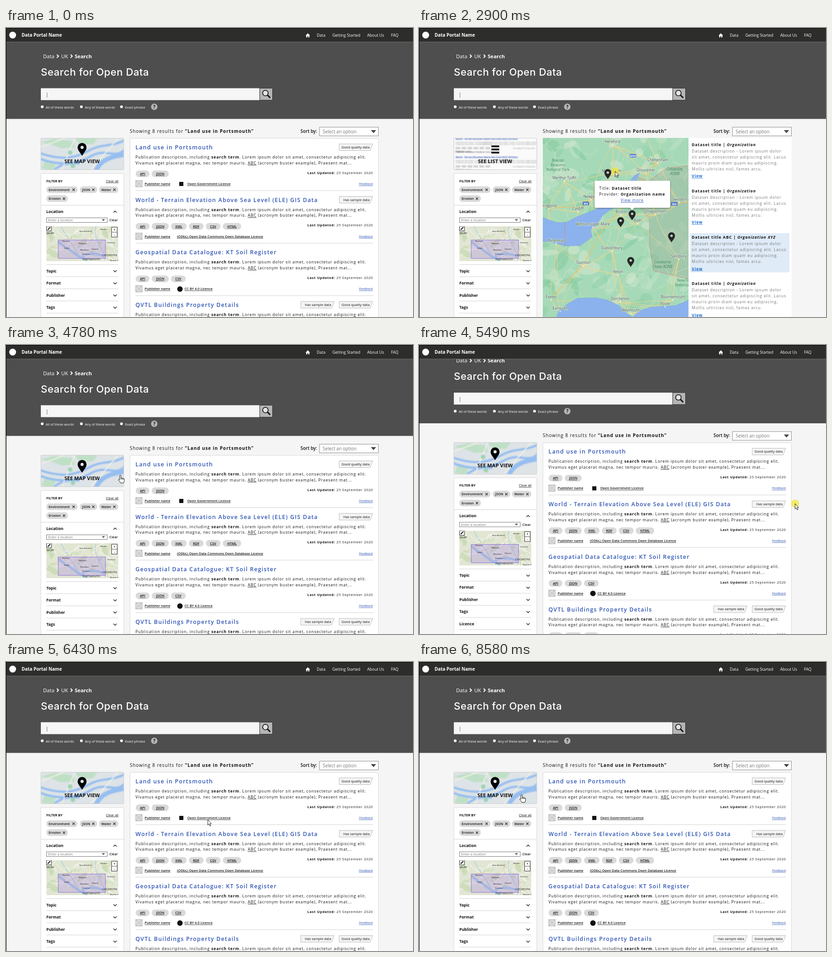
An HTML page that plays this animation: 888 by 631 pixels, repeating every 9.28 s.

```html
<!DOCTYPE html>
<html lang="en">
<head>
<meta charset="utf-8">
<title>Open data search</title>
<style>
  html, body { margin: 0; width: 100%; height: 100%; overflow: hidden; background: #f5f5f5; }
  #stage { display: block; width: 888px; height: 631px; }
  text { font-family: "Open Sans", sans-serif; fill: #111; }
  .b { font-weight: 700; }
  .m { font-weight: 600; }
  .i { font-style: italic; }
  .u { text-decoration: underline; }
  .s { letter-spacing: .1em; }
  .c { text-anchor: middle; }
  .w { fill: #fff; }
  .blue { fill: #2f55b4; }
  .link { fill: #1469d2; }
  .gray { fill: #757575; }
  .park { fill: #3f8a60; }
  .halo { paint-order: stroke; stroke: #dcefe0; stroke-width: 1.5px; fill: #3f4a48; }
  .head { font: 500 22px Inter, sans-serif; letter-spacing: .5px; }
</style>
</head>
<body>
<svg id="stage" viewBox="0 0 888 631"></svg>
<script>
// Type sizes are in units of a 1440 px wide layout.
const UNIT = 888 / 1440;
const text = (x, y, str, size, cls = '') =>
  `<text x="${x}" y="${y}" font-size="${(size * UNIT).toFixed(2)}" class="${cls}">${str}</text>`;
const span = (cls, str) => `<tspan class="${cls}">${str}</tspan>`;
const rect = (x, y, w, h, fill, more = '') =>
  `<rect x="${x}" y="${y}" width="${w}" height="${h}" fill="${fill}" ${more}/>`;
const path = (d, stroke, width = 1, fill = 'none', more = '') =>
  `<path d="${d}" stroke="${stroke}" stroke-width="${width}" fill="${fill}" ${more}/>`;
const shape = (d, fill) => `<path d="${d}" fill="${fill}"/>`;
const dot = (x, y, r, fill) => `<circle cx="${x}" cy="${y}" r="${r}" fill="${fill}"/>`;
const rule = (x, y, w) => rect(x, y, w, 1, '#d2d2d2');
const pin = (x, y, scale, fill, hole) =>
  `<g transform="translate(${x} ${y}) scale(${scale})">
    ${shape('M0 13C-3 7-9 2-9-4a9 9 0 1 1 18 0C9 2 3 7 0 13Z', fill)}${dot(0, -4, 3.2, hole)}</g>`;
const repeat = (n, fn) => Array.from({ length: n }, (_, i) => fn(i)).join('');

let seed = 7;
const random = (lo, hi) => {
  seed = (seed * 16807) % 2147483647;
  return lo + (hi - lo) * seed / 2147483647;
};
const wiggle = (x1, y1, x2, y2, bend) => {
  const control = k => [x1 + (x2 - x1) * k, y1 + (y2 - y1) * k].map(v => (v + random(-bend, bend)).toFixed(1)).join(' ');
  return `M${x1} ${y1}C${control(.33)} ${control(.67)} ${x2} ${y2}`;
};
const strokes = (n, x1, y1, x2, y2, length, bend) => repeat(n, () => {
  const x = random(x1, x2), y = random(y1, y2);
  return wiggle(x, y, x + random(-length, length), y + random(-length, length), bend);
});
const blobs = (n, x1, y1, x2, y2, size, fills) => repeat(n, () =>
  `<ellipse transform="translate(${random(x1, x2)} ${random(y1, y2)}) rotate(${random(0, 180)})"
    rx="${random(size / 4, size)}" ry="${random(size / 6, size / 2)}" fill="${fills[Math.floor(random(0, fills.length))]}" opacity=".55"/>`);

// ---- Page header ----
function nav() {
  return rect(0, 0, 888, 30, '#2d2d2c') + rect(0, 0, 888, 1, '#000') + rect(0, 30, 888, 1, '#6e6e6e') +
    dot(14.5, 15.5, 7.5, '#fff') + text(34, 19, 'Data Portal Name', 16, 'b w') +
    shape('M653.5 16.5l5-5 5 5h-1.5v4h-2.5v-3h-2v3H655v-4Z', '#fff') +
    text(678, 19.3, 'Data', 14, 'w') + text(712, 19.3, 'Getting Started', 14, 'w') +
    text(788, 19.3, 'About Us', 14, 'w') + text(840, 19.3, 'FAQ', 14, 'w');
}

function header() {
  const option = (x, str) => dot(x, 172, 3, '#fff') + text(x + 7.7, 175.6, str, 12, 'w');
  return rect(0, 0, 888, 198.5, '#4e4e4e') +
    text(81, 66, 'Data', 18, 'w') + text(120.5, 66, 'UK', 18, 'w') + text(150, 66, 'Search', 18, 'b w') +
    path('M111 58l3.5 3.5-3.5 3.5M141 58l3.5 3.5-3.5 3.5', '#fff', 2) +
    '<text x="76" y="103.5" class="head w">Search for Open Data</text>' +
    rect(76, 131.5, 477, 26, '#f6f6f6') + rect(89, 141, 1, 11, '#777') +
    rect(553.5, 131.5, 28, 26, '#b5b5b5', 'stroke="#333"') +
    '<circle cx="566" cy="142" r="6" fill="#e2e2e2" stroke="#111" stroke-width="1.7"/>' +
    path('M570.5 146.5l6 6', '#111', 3) +
    option(79, 'All of these words') + option(164.5, 'Any of these words') + option(252, 'Exact phrase') +
    dot(323.5, 172, 7, '#b5b5b5') + text(323.5, 175.6, '?', 16, 'b c') +
    text(270, 229, 'Showing 8 results for ' + span('b', '“Land use in Portsmouth”'), 16, 's') +
    text(642.5, 228.5, 'Sort by:', 16, 'm') +
    rect(684, 216.5, 128.5, 19, '#fff', 'stroke="#8c8c8c"') +
    text(691, 229.5, 'Select an option', 16, 'gray') + shape('M796 223h11.5l-5.7 6.5Z', '#444');
}

// ---- Sidebar ----
function locationMap() {
  return '<svg x="88" y="433" width="157" height="76" viewBox="88 433 157 76">' +
    rect(88, 433, 157, 76, '#e1e6d3') + blobs(34, 88, 433, 245, 500, 14, ['#bdd5a5', '#efeee6', '#cfdfbd']) +
    path('M114 466C130 482 142 484 152 494S170 500 176 509M166 498Q190 488 214 498', '#a9cfe3', 5) +
    path('M120 433C130 455 145 470 160 500M196 433q-5 20 10 45t8 31', '#a9cfe3', 1.4) +
    path(strokes(26, 88, 433, 245, 509, 45, 9), '#fff', .9) + path(strokes(6, 95, 445, 235, 490, 70, 12), '#e3bd83', .8) +
    rect(114, 463, 103, 40, '#9a74dc', 'fill-opacity=".27" stroke="#8b6fe0"') +
    [['SBURY', 88, 450], ['CHICHESTER', 210, 498], ['PORTSMOUTH', 167, 507]].map(([s, x, y]) => text(x, y, s, 9)).join('') +
    [['New Ainsford', 160, 445], ['Borden', 206, 441], ['Romsey', 123, 467], ['Waltham', 158, 472],
     ['Totton', 126, 482], ['Wickham', 162, 486], ['Havant', 187, 484], ['Fareham', 166, 495], ['Hosham', 221, 470], ['Bognor Regis', 227, 509]]
      .map(([s, x, y]) => text(x, y, s, 7)).join('') +
    rect(88.5, 433, 10.5, 10, '#fff', 'stroke="#222"') + path('M91 440.5l5.5-5.5', '#111', 2) +
    rect(230.5, 435, 12, 21.5, '#fff', 'stroke="#333"') + rect(230.5, 445.5, 12, .8, '#333') +
    text(236.5, 443, '+', 10, 'b c') + text(236.5, 453.5, '-', 10, 'b c') + '</svg>';
}

function sidebar() {
  const chip = (x, y, w, str) => rect(x, y, w, 14.5, '#dadada', 'rx="7"') + text(x + 5, y + 9.8, str, 12, 'm') +
    path(`M${x + w - 11} ${y + 4.8}l5 5m0-5l-5 5`, '#222', 1.2);
  const section = (str, i) => rule(88, 516 + i * 26.5, 157) + text(88, 533.5 + i * 26.5, str, 14, 'b') +
    path(`M234.5 ${529 + i * 26.5}l3.5 3.5 3.5-3.5`, '#222', 1.4);
  return rect(76, 317.5, 181, 500, '#fff', 'stroke="#d8d8d8" rx="2"') +
    text(88, 336.7, 'FILTER BY', 12, 'b') + text(218, 336.7, 'Clear all', 12, 'u') +
    chip(88, 345.8, 68, 'Environment') + chip(161, 345.8, 38, 'JSON') + chip(203, 345.8, 42, 'Water') +
    chip(88, 365.3, 47, 'Erosion') + rule(76, 386.5, 181) +
    text(88, 404, 'Location', 14, 'b') + path('M234.5 403l3.5-3.5 3.5 3.5', '#222', 1.4) +
    rect(88.5, 414.5, 132.5, 10, '#fff', 'stroke="#777"') + text(92, 422.2, 'Enter a location', 12, 'gray') +
    shape('M209 417.5h7l-3.5 4Z', '#555') + text(225.5, 422.2, 'Clear', 12, 'm') + locationMap() +
    ['Topic', 'Format', 'Publisher', 'Tags', 'Licence', 'Keywords', 'Update'].map(section).join('');
}

const thumb = (inner, label) =>
  `<svg x="76" y="240" width="181" height="70" viewBox="76 240 181 70">${inner}</svg>` +
  rect(76, 240.5, 181, 69, 'none', 'stroke="#d0d0d0" rx="2"') + text(166, 295, label, 18, 'b c');

// ---- List view ----
const summary = `Publication description, including ${span('b', 'search term')}. Lorem ipsum dolor sit amet, consectetur adipiscing elit.`;
const dataTitle = 'World - Terrain Elevation Above Sea Level (ELE) GIS Data';

function card([title, chips, badges, licence, mark], i) {
  let x = 283;
  const tags = chips.map(([str, w]) => {
    const tag = rect(x, 311, w, 14.5, '#dadada', 'rx="7"') + text(x + w / 2, 321, str, 12, 'm u c');
    x += w + 5;
    return tag;
  }).join('');
  const badge = (str, k) => {
    const left = 727 - 84 * k;
    return path(`M${left} 253h73l-5.5 14.5H${left}Z`, '#bbb', 1, '#f4f4f4') +
      text(left + (str[0] === 'H' ? 9 : 5), 262.9, str, 12);
  };
  return `<g transform="translate(0 ${i * 114.7})">` + text(282.5, 265, title, 20, 'm s blue') + badges.map(badge).join('') +
    text(282.5, 285, summary, 14, 's') +
    text(282.5, 297.8, `Vivamus eget placerat magna, nec tempor mauris. ${span('u', 'ABC')} (acronym buster example), Praesent mat...`, 14, 's') +
    tags + text(657.5, 318.8, span('b', 'Last Updated:') + ' 25 September 2020', 12, 's') +
    rect(283, 333, 14, 14, '#ddd', 'stroke="#aaa"') + path('M283 333l14 14m0-14l-14 14', '#aaa', .8) +
    text(302.5, 343, 'Publisher name', 12, 'm u') +
    (mark === 'square' ? rect(378, 336, 9, 9, '#111') : mark === 'circle' ? dot(379.5, 340.5, 6, '#111') : '') +
    text({ square: 395.5, circle: 389.5 }[mark] || 373, 343, licence, 12, 'm u') +
    text(770, 343, 'Feedback', 12, 'i u blue') + rule(283, 354.5, 518) + '</g>';
}

function listView() {
  const api = ['API', 30], json = ['JSON', 37], csv = ['CSV', 32];
  const good = 'Good quality data', sample = 'Has sample data';
  const blurredMap = '<g filter="url(#soft)">' + rect(70, 235, 195, 80, '#dde3e6') +
    shape('M76 250l30-8 40 5 5 14-30 2-20-8ZM150 240h50l-10 14h-30ZM85 290l25 5-8 16-25-4Z', '#bfe0c6') +
    path('M70 272C120 290 150 285 180 268S225 262 262 244M70 284C110 300 150 300 185 280S240 290 262 262M105 310Q125 292 160 296', '#96bff0', 5) +
    path('M195 315C205 285 235 280 262 276', '#96bff0', 10) +
    path('M70 262L130 240M120 315L150 240M180 315L245 240', '#f6f3e4', 2) + dot(140, 272, 5, '#9bd4b0') + dot(146, 301, 5, '#9bd4b0') + '</g>';
  return thumb(blurredMap + pin(166, 265, 1.08, '#000', '#dfe9f5'), 'SEE MAP VIEW') +
    rect(270.5, 241, 542, 600, '#fff', 'stroke="#d8d8d8" rx="2"') + [
      ['Land use in Portsmouth', [api, json], [good], 'Open Government Licence', 'square'],
      [dataTitle, [api, json, ['XML', 34], ['RDF', 32], csv, ['HTML', 40]], [sample], '(ODbL) Open Data Commons Open Database Licence'],
      ['Geospatial Data Catalogue: KT Soil Register', [api, json, csv], [], 'CC BY 4.0 Licence', 'circle'],
      ['QVTL Buildings Property Details', [api, json, csv], [good, sample], 'Open Government Licence', 'square']
    ].map(card).join('');
}

// ---- Map view ----
function map() {
  const towns = [
    ['Hereford', 422, 251], ['Cheltenham', 521, 291], ['Gloucester', 495, 313], ['Monmouth', 420, 315], ['Merthyr Tydfil', 317, 330],
    ['Swindon', 568, 377], ['Newport', 375, 371], ['Cardiff', 347, 397], ['Bridgend', 283, 391], ['Bristol', 441, 404], ['Bath', 477, 423],
    ['Chippenham', 516, 403], ['Weston-super-Mare', 379, 431], ['Minehead', 299, 467], ['Glastonbury', 421, 483], ['Salisbury', 567, 501],
    ['Taunton', 358, 515], ['Yeovil', 434, 535], ['Dorchester', 439, 594], ['Bournemouth', 554, 590], ['Poole', 537, 605],
    ['Exeter', 288, 590], ['Exmouth', 308, 615], ['Weymouth', 462, 619]];
  const roads = towns.map(([, x, y]) => [...towns]
    .sort((a, b) => Math.hypot(a[1] - x, a[2] - y) - Math.hypot(b[1] - x, b[2] - y)).slice(1, 5)
    .map(([, x2, y2]) => wiggle(x, y + 5, x2, y2 + 5, 9)).join('')).join('');
  const shield = (x, y, str) => rect(x - 7, y - 4, 14, 8, '#4b73c9', 'rx="1.5"') + text(x, y + 2.5, str, 10, 'b c w');
  const lines = (x, y, rows, cls) => rows.map((s, k) => text(x, y + k * 10, s, 13, cls)).join('');
  return rect(230, 100, 420, 560, '#a6d9b8') +
    blobs(130, 260, 140, 600, 640, 28, ['#83cc9f', '#8ed2a8', '#bfe3c8', '#d3e8d0']) +
    path('M470 322L500 335 540 306 640 295V560L588 548 512 530 503 470 503 418 470 375Z', '#d98374', .8, '#9fb8a0', 'fill-opacity=".5"') +
    path(strokes(110, 260, 140, 600, 590, 45, 14), '#e4ecc5', .7, 'none', 'opacity=".8"') +
    path(roads + 'M422 256L400 170M422 256L330 170M521 295L540 170M521 295L470 170', '#f0d68b', 1) +
    path('M230 390L347 392 375 372 441 385 516 382 568 382 640 372M521 290L495 320 462 360 441 395 400 440 362 512 288 590', '#efc066', 1.6) +
    path('M230 410L270 414 300 425 322 424 345 412 366 404 395 392 430 372 452 345 470 322 482 316 472 335 455 365 430 388 402 408 386 432 374 440 378 456 352 475 320 476 290 468 230 462ZM230 660V640L300 631 306 616 328 600 346 590 386 589 412 594 436 606 452 622 466 631 480 618 506 609 532 608 560 606 588 594 650 592V660Z', '#78a0d8', .6, '#8cb2ee') +
    path('M318 424V476', '#cf7f78', .8) +
    towns.map(([s, x, y]) => dot(x, y + 4, 1.3, '#fff') + text(x, y, s, 13, 'c halo')).join('') +
    lines(303, 292, ['Brecon', 'Beacons', 'National Park'], 'c park') + lines(558, 311, ['Cotswolds', 'AONB'], 'c i park') +
    lines(531, 514, ['Cranborne', 'Chase AONB'], 'c i park') + lines(584, 554, ['New Forest', 'National Park'], 'c park') +
    shield(467, 279, 'M50') + shield(364, 383, 'M4') + shield(557, 384, 'M4') +
    [[412, 319], [465, 409], [440, 424], [551, 457], [462, 511]].map(([x, y]) => pin(x, y, .84, '#262626', '#b9d7c4')).join('') +
    '<g filter="url(#shadow)">' + rect(383, 333.5, 165, 59, '#fff', 'rx="3"') + shape('M460 392h10l-5 6Z', '#fff') + '</g>' +
    text(393, 353, 'Title: ' + span('b', 'Dataset title'), 14, 's') +
    text(393, 366, 'Provider: ' + span('b', 'Organization name'), 14, 's') + text(440, 379, 'View more', 14, 's u blue');
}

function mapView() {
  const blurredList = rect(76, 240, 181, 70, '#fafafa') + '<g filter="url(#soft)">' +
    [244, 284].map(y => text(80, y, dataTitle, 8, 'b blue') + text(80, y + 6.5, summary, 6, 'gray') + text(80, y + 11, summary, 6, 'gray') +
      repeat(6, i => rect(80 + i * 13, y + 16, 10, 4.5, '#ccc')) + text(205, y + 20, 'Last Updated: 25 September', 6, 'gray') +
      text(80, y + 28, 'Publisher name', 7, 'm') + text(112, y + 28, 'Open Database Licence', 7)).join('') + '</g>';
  const entry = i => {
    const y = 258 + i * 101.1, special = i === 2;
    return (special ? rect(592, 448, 216, 85.5, '#dfebf7', 'rx="2"') : '') +
      text(595, y, `Dataset title ${special ? 'ABC ' : ''}| ` + span('i', 'Organization' + (special ? ' XYZ' : '')), 14, 'b s') +
      ['Dataset description - Lorem ipsum dolor', 'sit amet, consectetur adipiscing elit. Lacus', 'mauris proin diam quam eu adipiscing.', 'Mollis ultricies nisl, fames arcu.']
        .map((s, k) => text(595, y + 14 + k * 13, s, 14, 's gray')).join('') +
      text(595, y + 68.3, 'View', 14, 'b s u link');
  };
  return thumb(blurredList + repeat(3, i => rect(158, 256.5 + i * 6.8, 17, 3.8, '#000')), 'SEE LIST VIEW') +
    rect(269, 240, 544, 391, '#fff') +
    `<svg x="270" y="240" width="318" height="391" viewBox="270 240 318 391"><g id="map">${map()}</g></svg>` + repeat(4, entry);
}

document.getElementById('stage').innerHTML = `
  <defs>
    <filter id="soft"><feGaussianBlur stdDeviation="1.2"/></filter>
    <filter id="shadow"><feDropShadow dx="0" dy="1" stdDeviation="1.5" flood-opacity=".6"/></filter>
  </defs>
  <g id="page">${header()}${sidebar()}${listView()}<g id="mapView">${mapView()}</g></g>
  ${nav()}${rect(0, 0, 1, 631, '#000')}
  <g id="cursor">
    <circle id="press" r="9" fill="#f3e53c" opacity=".75"/>
    <path id="arrow" d="M0 0V11.5L2.7 9 4.6 13.5 6.5 12.7 4.6 8.4H8Z" fill="#fff" stroke="#111" stroke-width=".9"/>
    <path id="hand" d="M-1.5 1.5Q0-.5 1.5 1.5V7Q3 5.8 4 7.3 5.5 6.3 6.3 7.9 8.5 7.3 8.5 9.5V12.5Q8.5 15 7 17.5H.5Q-1 14.5-4 11.5-4.8 9-1.5 10.5ZM1.5 7V10M4 7.3V10M6.3 7.9V10" fill="#fff" stroke="#111"/>
  </g>`;

// ---- Motion ----
const el = Object.fromEntries(['page', 'mapView', 'map', 'cursor', 'press', 'arrow', 'hand'].map(id => [id, document.getElementById(id)]));
const LOOP = 9280;
const part = (t, from, to) => Math.min(1, Math.max(0, (t - from) / (to - from)));
const between = (t, from, to) => t >= from && t < to;
const bump = (t, from, to) => Math.sin(Math.PI * part(t, from, to));
const show = (node, on) => node.setAttribute('visibility', on ? 'visible' : 'hidden');
const move = (node, x, y) => node.setAttribute('transform', `translate(${x.toFixed(2)} ${y.toFixed(2)})`);
const smooth = p => p * p * (3 - 2 * p), linear = p => p, slowing = p => p * (2 - p);

// [start, end, x, y, easing]: the pointer reaches x, y at the end time
const moves = [
  [350, 1250, 189, 274, smooth], [2520, 2890, 428, 313, smooth], [2910, 3460, 421, 297, linear],
  [3690, 4300, 219, 279, smooth], [4680, 5420, 820, 373, smooth], [5430, 5890, 824, 381, linear],
  [5890, 6530, 370, 338, linear], [6530, 6950, 224, 289, slowing]];

function pointer(t) {
  let x = 494, y = 640;
  for (const [from, to, endX, endY, ease] of moves) {
    const k = ease(part(t, from, to));
    x += (endX - x) * k;
    y += (endY - y) * k;
  }
  return [x, y];
}

function draw(now) {
  const t = now % LOOP;
  const shown = part(t, 2045, 2240) - part(t, 4390, 4540) + part(t, 7375, 7510) - part(t, 8440, 8580);
  el.mapView.setAttribute('opacity', shown);
  show(el.mapView, shown > 0);

  // The page is dragged down and back, the map likewise but with a lag.
  const scroll = 68 * bump(t, 5430, 5890);
  move(el.page, 0, -scroll);
  if (t < 7000) move(el.map, -7 * part(t, 2910, 3460), 84 * bump(Math.min(t, 3475), 2910, 3500));
  else move(el.map, 0, 0);

  const [x, baseY] = pointer(t);
  const y = baseY - scroll + 60 * bump(t, 2910, 3460);
  move(el.cursor, x, y);
  const visible = t >= 350;
  const overButton = t > 1275 && x < 257 && y > 240 && y < 310;
  show(el.hand, visible && overButton);
  show(el.arrow, visible && !overButton);
  show(el.press, between(t, 2870, 3690) || between(t, 5420, 5900));
  requestAnimationFrame(() => draw(performance.now() - start));
}
const start = performance.now();
draw(0);
</script>
</body>
</html>
```
